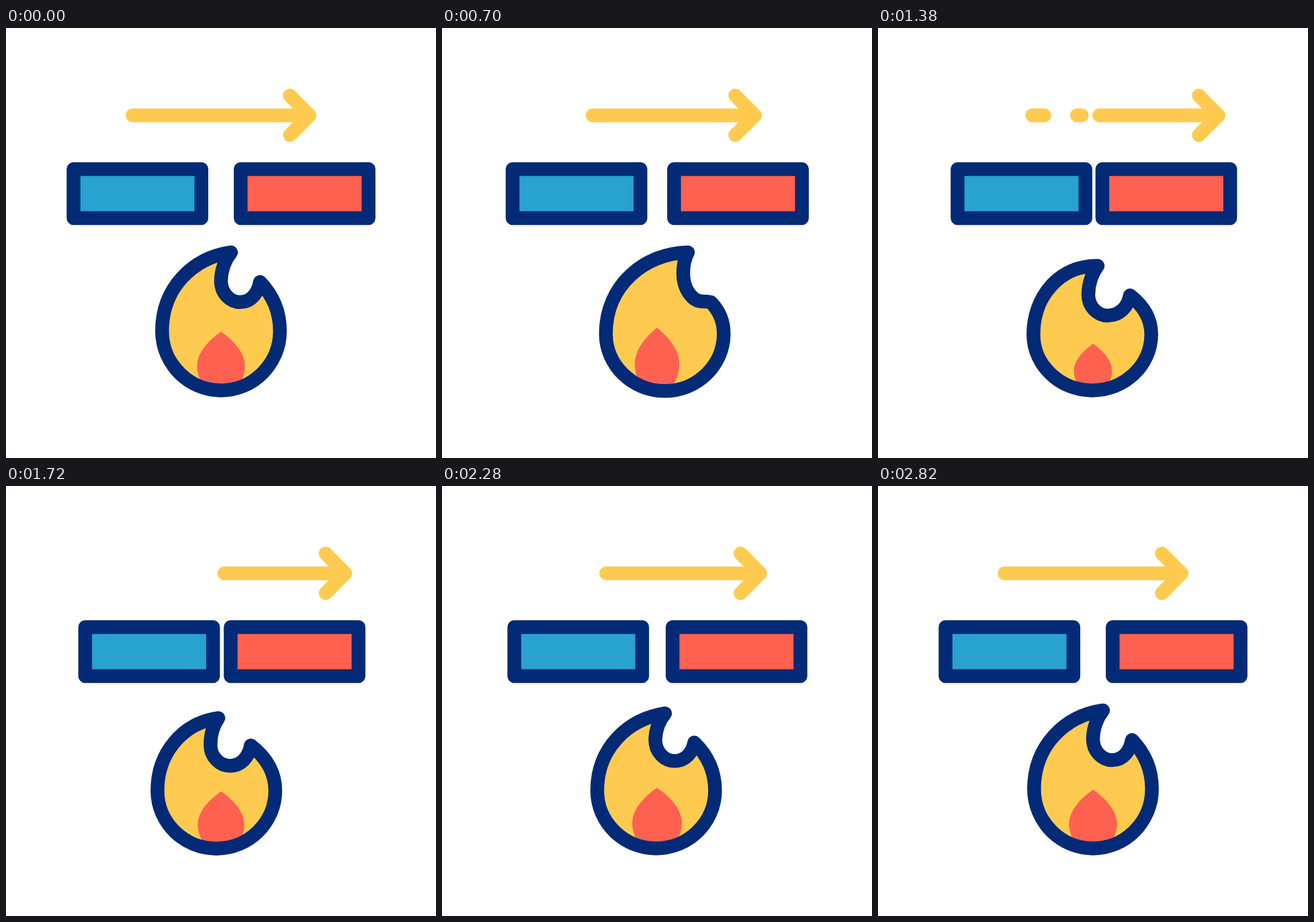
Animation of 640x640 px, one loop 3.6 s. Source, as an HTML page:

```html
<!DOCTYPE html>
<html lang="en">
<head>
<meta charset="utf-8">
<style>
  html, body { margin: 0; width: 100%; height: 100%; overflow: hidden; background: #fff; }
  svg { display: block; width: 100%; height: 100%; }
  path, rect { stroke-width: 20.5; stroke-linecap: round; stroke-linejoin: round; }
  .outline { stroke: #022a76; }
  .arrow { fill: none; stroke: #fecb50; }
</style>
</head>
<body>
<svg viewBox="0 0 640 640">
  <path id="trail" class="arrow"/>
  <path id="shaft" class="arrow"/>
  <path id="head" class="arrow" d="M422.4 100.5L451.8 130L422.4 159.5"/>
  <rect id="cold" class="outline" fill="#28a2ce" x="100.5" y="210" width="190.3" height="73"/>
  <rect id="hot" class="outline" fill="#ff6151" x="349.3" y="210" width="190.3" height="73"/>
  <path id="body" fill="#fecb50"/>
  <path id="core" fill="#ff6151"/>
  <path id="rim" class="outline" fill="none"/>
</svg>
<script>
const LOOP = 3600, HALF = 87.7;

const $ = id => document.getElementById(id);
const mix = (a, b, k) => a + (b - a) * k;
const ease = (t, from, to) => {
  const x = Math.min(1, Math.max(0, (t - from) / (to - from)));
  return x * x * (3 - 2 * x);
};
const pulse = (t, from, peak, to) => ease(t, from, peak) - ease(t, peak, to);
const shift = (id, x) => $(id).setAttribute("transform", `translate(${x} 0)`);
const draw = (id, d) => $(id).setAttribute("d", d);

// The flame leans right, sinks, deepens its notch, leans left, then right again.
function drawFlame(t) {
  const fold = pulse(t, 400, 700, 1020);
  const low = ease(t, 700, 1020) - ease(t, 1380, 2060);
  const sag = pulse(t, 1020, 1380, 2060);
  const left = pulse(t, 1380, 2060, 2520);
  const right = pulse(t, 2060, 2520, 2810);
  const sway = fold - 1.1 * left + right;

  const drop = 20 * low + 3 * left + 6 * right;
  const tipX = 335 + 27 * sway - 8 * low + 4 * fold, tipY = 334 + drop;
  const hornX = 378 + 22 * sway - 3 * low, hornY = 378 + drop + 6 * sway + 24 * fold;
  const notchX = hornX - 29 + 17 * fold - 4 * sag;
  const notchY = 408 - fold + 4 * low + 16 * sag - 3 * left + 6 * right;
  const neckX = notchX - 29, neckY = notchY - 31 - 11 * fold;

  const cx = 320 + 11.6 * sway - low, cy = 451 + 5 * low + 4 * fold + 5 * right;
  const x0 = cx - HALF, x1 = cx + HALF;
  const base = 539.4 + .9 * sway * sway;
  const waist = mix(cy, base, .55), bend = HALF * .55;
  const outline = `M${tipX} ${tipY}
    C${tipX - 57 - 7 * sway} ${tipY + 8 - 9 * low - 7 * sway} ${x0} ${mix(cy, tipY, .55 + .05 * sway)} ${x0} ${cy}
    C${x0} ${waist} ${cx - bend} ${base} ${cx} ${base}
    C${cx + bend} ${base} ${x1} ${waist} ${x1} ${cy}
    C${x1} ${mix(cy, hornY, .4)} ${mix(hornX, x1, .62)} ${mix(hornY, cy, .26)} ${hornX} ${hornY}
    C${hornX - 3} ${mix(hornY, notchY, .55)} ${mix(notchX, hornX, .55)} ${notchY} ${notchX} ${notchY}
    C${mix(notchX, neckX, .55)} ${notchY} ${neckX} ${mix(neckY, notchY, .55)} ${neckX} ${neckY}
    C${neckX} ${mix(neckY, tipY, .4)} ${mix(tipX, neckX, .55)} ${mix(tipY, neckY, .23)} ${tipX} ${tipY}Z`;
  draw("body", outline);
  draw("rim", outline);

  const top = 452 - 6 * fold + 18 * low - 13 * left + 8 * right;
  const wide = mix(540, top, .42), w = .405 * (540 - top) - 5 * fold;
  const x = k => 320 + w * k;
  draw("core", `M320 ${top}
    C${x(-.55)} ${mix(top, wide, .27)} ${x(-1)} ${mix(wide, top, .38)} ${x(-1)} ${wide}
    C${x(-1)} ${mix(wide, 540, .45)} ${x(-.75)} 532 ${x(-.55)} 540
    H${x(.55)}
    C${x(.75)} 532 ${x(1)} ${mix(wide, 540, .45)} ${x(1)} ${wide}
    C${x(1)} ${mix(wide, top, .38)} ${x(.55)} ${mix(top, wide, .27)} 320 ${top}Z`);
}

// Two dashes run along a fixed stretch behind the arrow.
function drawTrail(t) {
  const front = 145 + .468 * (t - 1020);
  let d = "";
  for (const end of [front, front - 66.5]) {
    const a = Math.max(141, end - 18), b = Math.min(303.5, end);
    if (b > a) d += `M${a} 130H${b}`;
  }
  draw("trail", d);
}

function frame(now) {
  const t = now % LOOP;
  const p = ease(t, 392, 1330) - ease(t, 1593, 2803);
  shift("cold", 17.9 * p);
  shift("hot", -15.4 * p);
  shift("head", 55 * p);
  draw("shaft", `M${188.3 + 141 * p} 130H${449 + 55 * p}`);
  drawTrail(t);
  drawFlame(t);
  requestAnimationFrame(frame);
}
frame(performance.now());
</script>
</body>
</html>
```
